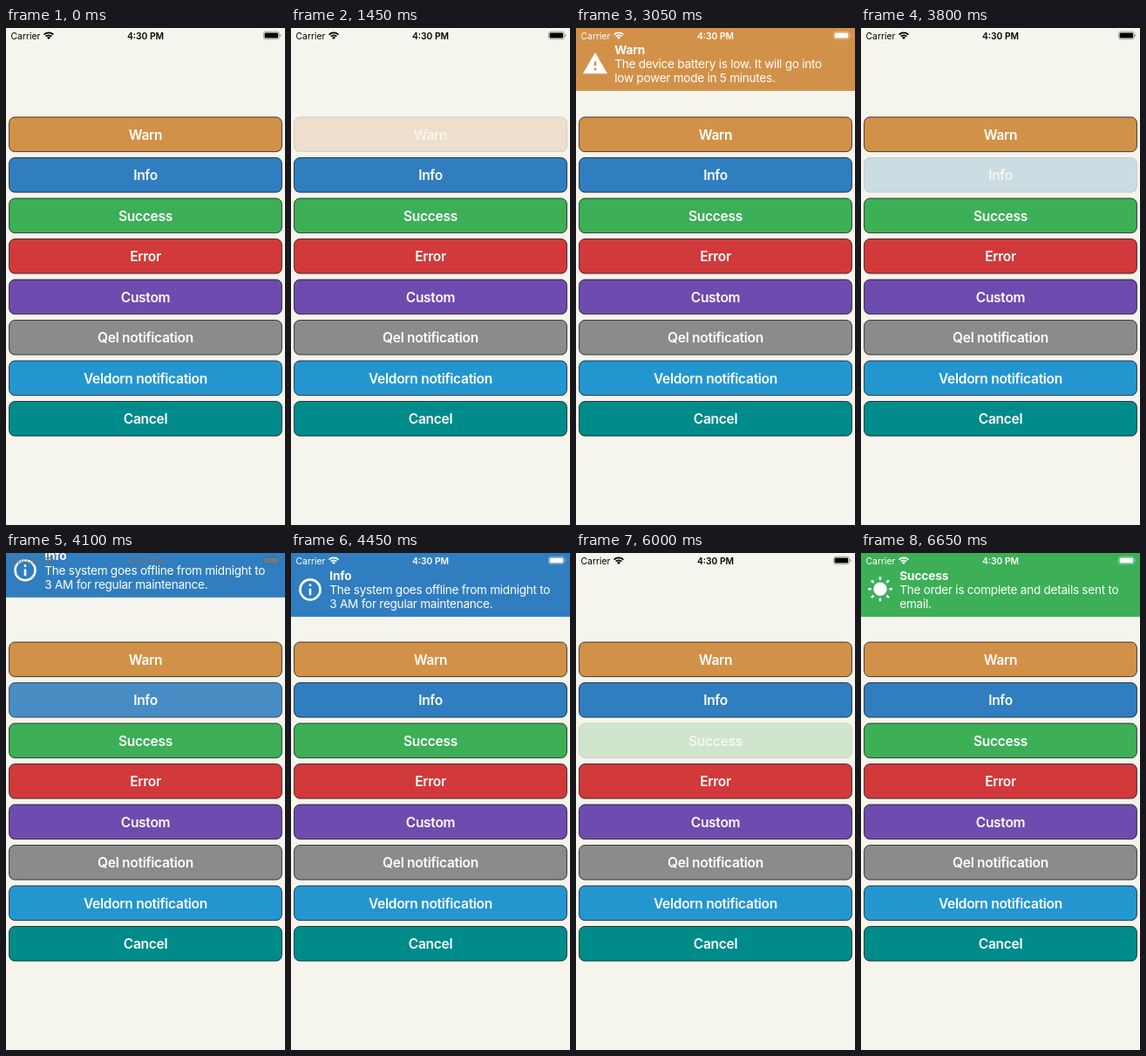
Animation of 320 by 569 pixels, one loop 8000 ms. Source, as an HTML page:

```html
<!DOCTYPE html>
<html lang="en">
<head>
<meta charset="utf-8">
<title>Alerts</title>
<style>
  html, body { margin: 0; width: 100%; height: 100%; overflow: hidden; background: #f5f4ed; }
  svg { display: block; width: 320px; height: 569px; font-family: Inter, sans-serif; }
  .label { font-size: 15.5px; font-weight: 600; letter-spacing: -.018em; fill: #fff; text-anchor: middle; }
  .title { font-size: 13.65px; font-weight: 700; letter-spacing: -.01em; }
  .body { font-size: 13.6px; letter-spacing: -.02em; }
  .bar { font-size: 10.3px; }
</style>
</head>
<body>
<svg id="stage" viewBox="0 0 320 569"></svg>
<script>
const LOOP = 8000, STEP = 50, TRAVEL = 100;

const buttons = [
  ['Warn', '#d29149'], ['Info', '#307ebf'], ['Success', '#3caf57'], ['Error', '#d1393a'],
  ['Custom', '#6e4bae'], ['Qel notification', '#8b8b8b'],
  ['Veldorn notification', '#2396d0'], ['Cancel', '#008b8b']
];

const ray = a => `<path d="M8.1 0H10.95" stroke="#fff" stroke-width="2" transform="translate(12 11.5) rotate(${a})"/>`;
const icons = [
  '<path fill-rule="evenodd" d="M1 21h22L12 2zM13 18h-2v-2h2zM13 14h-2v-4h2z"/>',
  '<circle cx="12" cy="12" r="9" fill="none" stroke="#fff" stroke-width="2"/><path d="M11 7h2v2h-2zM11 11h2v6h-2z"/>',
  '<circle cx="12" cy="11.5" r="6"/>' + [0, 45, 90, 135, 180, 225, 270, 315].map(ray).join('')
];

// Each alert belongs to the button with the same index; times in ms.
const alerts = [
  { press: 1450, release: 1520, open: 1535, close: 3040,
    lines: ['The device battery is low. It will go into', 'low power mode in 5 minutes.'] },
  { press: 3800, release: 3920, open: 3925, close: 4790,
    lines: ['The system goes offline from midnight to', '3 AM for regular maintenance.'] },
  { press: 6000, release: 6120, open: 6125, close: Infinity,
    lines: ['The order is complete and details sent to', 'email.'] }
];

const buttonMarkup = ([name, color], i) => `
  <g class="button">
    <rect x="3.6" y="${102 + i * 46.5}" width="312.8" height="39.6" rx="6.6" fill="${color}" stroke="#000" stroke-width=".7"/>
    <text class="label" x="160" y="${127.6 + i * 46.5}">${name}</text>
  </g>`;

const alertMarkup = ({ lines }, i) => `
  <g class="alert" fill="#fff">
    <rect y="-30" width="320" height="103" fill="${buttons[i][1]}"/>
    <g transform="translate(6.64 26.5) scale(1.28)">${icons[i]}</g>
    <text class="title" x="44.3" y="30.6">${buttons[i][0]}</text>
    ${lines.map((s, n) => `<text class="body" x="44.3" y="${47.1 + n * 16.2}">${s}</text>`).join('')}
  </g>`;

const arc = r => {
  const d = r * Math.SQRT1_2;
  return `M${49 - d} ${13 - d}A${r} ${r} 0 0 1 ${49 + d} ${13 - d}`;
};

const statusMarkup = color => `
  <g class="bar" fill="${color}">
    <text x="5.6" y="12.6">Carrier</text>
    <path d="${arc(7.6)}${arc(4.7)}" fill="none" stroke="${color}" stroke-width="1.8"/>
    <path d="${arc(2.8)}L49 13z"/>
    <text x="160" y="12.6" text-anchor="middle" font-weight="600">4:30 PM</text>
    <rect x="295.4" y="4.2" width="18" height="8.6" rx="2.4" fill="none" stroke="${color}" stroke-width=".8" opacity=".4"/>
    <rect x="296.6" y="5.4" width="15.6" height="6.2" rx="1.4"/>
    <path d="M314.4 7.1q1.2 .4 1.2 1.4t-1.2 1.4z" opacity=".45"/>
  </g>`;

const stage = document.getElementById('stage');
stage.innerHTML = '<rect width="320" height="569" fill="#f5f4ed"/>' +
  buttons.map(buttonMarkup).join('') + alerts.map(alertMarkup).join('') +
  statusMarkup('#000') + statusMarkup('#fff');

const buttonEls = stage.querySelectorAll('.button');
const alertEls = stage.querySelectorAll('.alert');
const [darkBar, lightBar] = stage.querySelectorAll('.bar');

const clamp = v => Math.min(1, Math.max(0, v));
const ramp = (t, start, length) => clamp((t - start) / length);
const easeInOut = p => p < .5 ? 2 * p * p : 1 - 2 * (1 - p) * (1 - p);

// Damped spring from 0 to 1: stiffness 230.2, damping 28, mass 1.
function spring(ms) {
  if (ms <= 0) return 0;
  const s = ms / 1000, decay = 14, w = Math.sqrt(230.2 - decay * decay);
  return 1 - Math.exp(-decay * s) * (Math.cos(w * s) + decay / w * Math.sin(w * s));
}

function draw(t) {
  let light = 0;
  alerts.forEach((a, i) => {
    const shown = spring(t - a.open) - spring(t - a.close);
    alertEls[i].setAttribute('transform', `translate(0 ${(shown - 1) * TRAVEL})`);
    const opacity = t < a.press ? 1 : .2 + .8 * easeInOut(ramp(t, a.release, 250));
    buttonEls[i].setAttribute('opacity', opacity);
    light += ramp(t, a.open + 65, 300) - ramp(t, a.close + 40, 300);
  });
  darkBar.setAttribute('opacity', 1 - light);
  lightBar.setAttribute('opacity', light);
}

const start = performance.now();
function tick() {
  const t = (performance.now() - start) % LOOP;
  draw(Math.floor(t / STEP) * STEP);
  requestAnimationFrame(tick);
}
tick();
</script>
</body>
</html>
```
